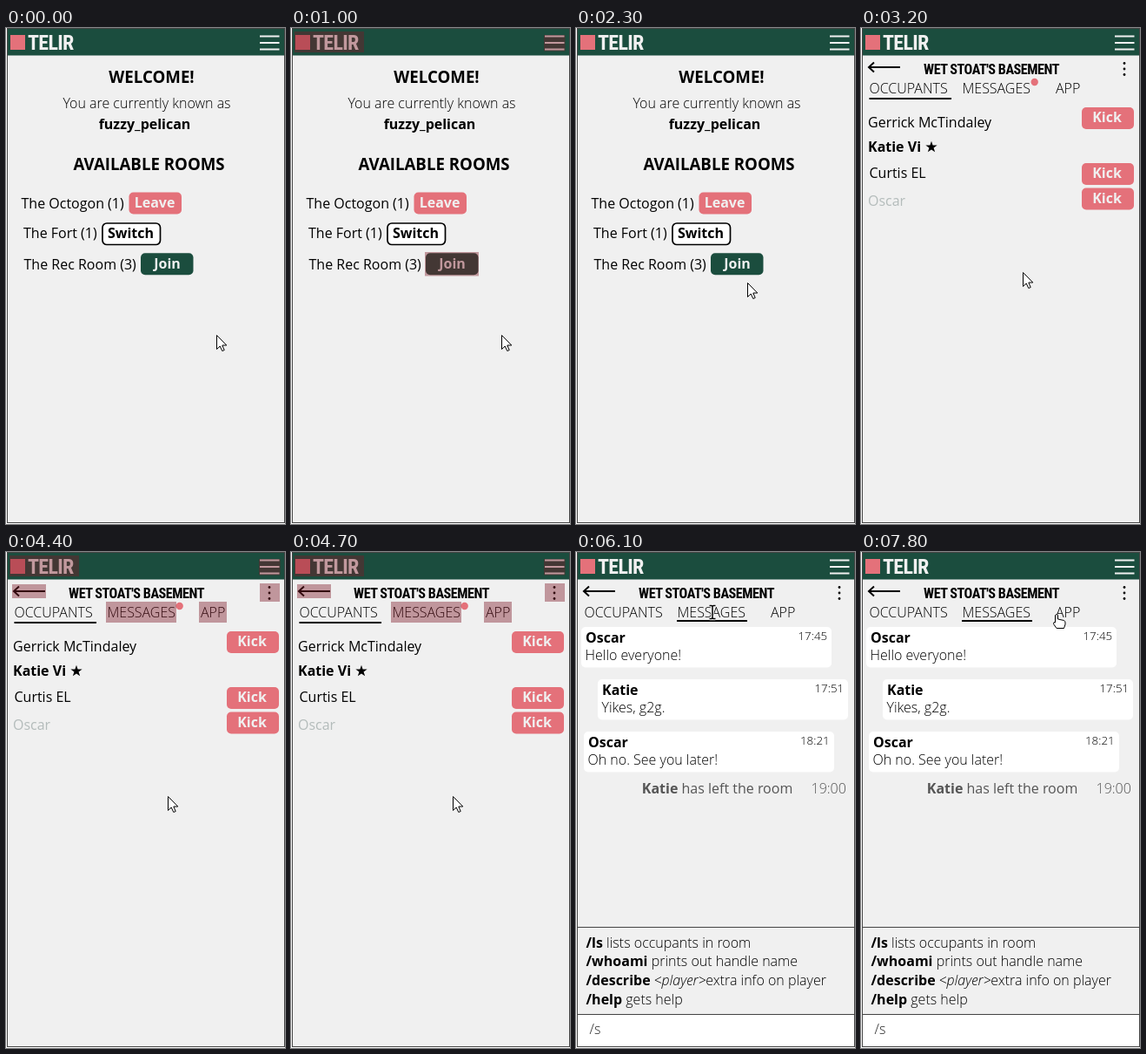
Write an HTML page that moves like this. It is 321 px wide and 569 px high and loops after 8 s.

```html
<!DOCTYPE html>
<html lang="en">
<head>
<meta charset="utf-8">
<title>Chat rooms prototype</title>
<style>
html, body { margin: 0; width: 100%; height: 100%; overflow: hidden; background: #fff; }
svg { display: block; width: 321px; height: 569px; }
text { font: 400 16px "Open Sans", "Noto Sans", sans-serif; white-space: pre; }
.light { font-weight: 300; }
.bold { font-weight: 700; }
.head { font-weight: 700; font-size: 18.67px; }
.mid { text-anchor: middle; }
.end { text-anchor: end; }
.time { font-weight: 300; font-size: 13.33px; }
.label { font-weight: 700; text-anchor: middle; fill: #f0f0f0; }
.narrow {
  font-family: "Roboto Condensed", Roboto, sans-serif;
  font-weight: 700; font-stretch: 75%; letter-spacing: -.03em;
}
.logo { font-size: 24px; fill: #f0f0f0; }
.title { font-size: 18px; }
.line { fill: none; stroke: #000; stroke-width: 2; }
.hot rect { fill: rgb(125, 25, 38); }
.cursor { fill: #fff; stroke: #000; }
.pink { fill: #e4717a; }
</style>
</head>
<body>
<svg viewBox="0 0 321 569">
  <rect x="1" y="1" width="320" height="567" fill="#f0f0f0"/>
  <rect x="1" y="1" width="320" height="30.5" fill="#1b4d3e"/>
  <rect class="pink" x="5" y="8" width="17" height="17"/>
  <text class="narrow logo" x="25" y="25" data-width="57">TELIR</text>
  <path d="M292 9.5H314.5M292 17H314.5M292 24.5H314.5" stroke="#f0f0f0" stroke-width="2.2"/>

  <g id="lobby">
    <text class="head mid" x="167.5" y="63">WELCOME!</text>
    <text class="light mid" x="162" y="92">You are currently known as</text>
    <text class="bold mid" x="159.5" y="116">fuzzy_pelican</text>
    <text class="head mid" x="164.5" y="163">AVAILABLE ROOMS</text>
    <text x="17.5" y="207">The Octogon (1)</text>
    <text x="20" y="241">The Fort (1)</text>
    <text x="20.5" y="277">The Rec Room (3)</text>
    <rect class="pink" x="141.5" y="188.5" width="60.5" height="25" rx="5"/>
    <text class="label" x="171" y="206">Leave</text>
    <rect x="111" y="224" width="66.5" height="24.5" rx="5" fill="#fff" stroke="#000" stroke-width="1.7"/>
    <text class="bold mid" x="143.5" y="241">Switch</text>
    <rect x="155" y="258.3" width="60.5" height="25" rx="5" fill="#1b4d3e"/>
    <text class="label" x="185.5" y="276">Join</text>
  </g>

  <g id="room">
    <path class="line" d="M45 45H9M15 39.5L9 45L15 50.5"/>
    <text class="narrow title mid" x="150" y="52.5" data-width="156">WET STOAT'S BASEMENT</text>
    <g><circle cx="303" cy="40.5" r="1.4"/><circle cx="303" cy="47" r="1.4"/><circle cx="303" cy="53.5" r="1.4"/></g>
    <text class="light" x="9.5" y="75">OCCUPANTS</text>
    <text class="light" x="116.5" y="75">MESSAGES</text>
    <text class="light" x="224" y="75">APP</text>
  </g>

  <g id="occupants">
    <path class="line" d="M9.5 81H104"/>
    <circle class="pink" cx="199.7" cy="62" r="4.2"/>
    <text x="8" y="114">Gerrick McTindaley</text>
    <text class="bold" x="8" y="142">Katie Vi</text>
    <path id="star"/>
    <text x="9.5" y="172">Curtis EL</text>
    <text x="8" y="204" fill="#b4bcbb">Oscar</text>
  </g>

  <g id="messages">
    <path class="line" d="M116 79H197"/>
    <g id="cards"></g>
    <text class="end" x="249.3" y="277" fill="#555"><tspan class="bold">Katie</tspan> has left the room</text>
    <text class="light" x="270.5" y="277" fill="#555">19:00</text>
    <path d="M1 430.5H321" stroke="#444"/>
    <text class="light" x="11.5" y="454"><tspan class="bold">/ls</tspan> lists occupants in room</text>
    <text class="light" x="11.5" y="475"><tspan class="bold">/whoami</tspan> prints out handle name</text>
    <text class="light" x="11.5" y="497"><tspan class="bold">/describe</tspan> <tspan font-style="italic">&lt;player&gt;</tspan>extra info on player</text>
    <text class="light" x="11.5" y="519"><tspan class="bold">/help</tspan> gets help</text>
    <rect x="1.5" y="530.5" width="319" height="37" fill="#fff" stroke="#444"/>
    <text class="light" x="15.5" y="553" fill="#222">/s</text>
  </g>

  <rect x="1.5" y=".5" width="319" height="567" fill="none" stroke="#444"/>

  <g class="hot" id="hotBar">
    <rect x="4" y="4" width="80" height="24"/>
    <rect x="291" y="8" width="24.5" height="18.5"/>
  </g>
  <g class="hot" id="hotLobby"><rect x="154" y="257" width="62" height="27.5"/></g>
  <g class="hot" id="hotRoom">
    <rect x="7" y="37" width="39" height="16"/>
    <rect x="292" y="36" width="23" height="21"/>
    <rect x="115" y="57" width="81" height="24"/>
    <rect x="222" y="57" width="32" height="24"/>
  </g>

  <g id="pointer">
    <path id="arrow" class="cursor" d="M.5 .5V16.5L4.2 13L6.8 18.5L9.2 17.5L6.8 12H11.8Z"/>
    <path id="hand" class="cursor" d="M-1.5 9.5V1.5Q0 -.5 1.5 1.5V6L8.5 7.5Q10 8 10 10V12L8.5 16.5H0L-3.5 11.5Q-3.5 8.5 -1.5 10Z"/>
    <g id="ibeam" fill="none">
      <path d="M-3.5 -7.5H3.5M0 -7.5V7.5M-3.5 7.5H3.5" stroke="#fff" stroke-width="3.4"/>
      <path d="M-3.5 -7.5H-1L0 -6.5L1 -7.5H3.5M0 -6.5V6.5M-3.5 7.5H-1L0 6.5L1 7.5H3.5" stroke="#000" stroke-width="1.5"/>
    </g>
  </g>
</svg>
<script>
const $ = id => document.getElementById(id);
const LOOP = 8000, STEP = 100;
const ENTER_ROOM = 3100, OPEN_MESSAGES = 6100;
const FLASHES = [1000, 4400, 4700];

// time, x, y, cursor kind
const TRACK = [
  [0, 242, 352, "arrow"], [1800, 242, 352, "arrow"], [2000, 272, 342, "arrow"],
  [2200, 220, 312, "arrow"], [2300, 197, 292, "arrow"], [2400, 189, 285, "arrow"],
  [2500, 189, 285, "arrow"], [2600, 187, 281, "hand"], [2700, 187, 281, "hand"],
  [2800, 186, 280, "hand"], [3200, 186, 280, "arrow"], [4900, 186, 280, "arrow"],
  [5200, 165, 145, "arrow"], [5400, 160, 98, "arrow"], [5500, 158, 78, "arrow"],
  [5600, 157, 69, "hand"], [6100, 157, 69, "ibeam"], [6700, 157, 69, "ibeam"],
  [7200, 198, 75, "arrow"], [7600, 225, 71, "arrow"], [7800, 225, 71, "hand"]
];

const kickButton = y => `<rect class="pink" x="254" y="${y}" width="60" height="25" rx="5"/>
  <text class="label" x="283" y="${y + 17}">Kick</text>`;
$("occupants").innerHTML += [91, 155, 183.5].map(kickButton).join("");

const card = (x, y, name, words, time, timeX) => `
  <rect x="${x}" y="${y}" width="288" height="46.5" rx="5" fill="#fff"/>
  <text class="bold" x="${x + 5}" y="${y + 18}">${name}</text>
  <text class="light" x="${x + 4.5}" y="${y + 38}">${words}</text>
  <text class="time" x="${timeX}" y="${y + 15}">${time}</text>`;
$("cards").innerHTML =
  card(6, 86, "Oscar", "Hello everyone!", "17:45", 255.5) +
  card(25, 146, "Katie", "Yikes, g2g.", "17:51", 274.5) +
  card(9, 206, "Oscar", "Oh no. See you later!", "18:21", 258);

const starPoint = i => {
  const radius = i % 2 ? 2.7 : 7, angle = i * Math.PI / 5;
  return `${81 + radius * Math.sin(angle)} ${136.7 - radius * Math.cos(angle)}`;
};
$("star").setAttribute("d", "M" + Array.from({ length: 10 }, (_, i) => starPoint(i)).join("L") + "Z");

// Use a smaller size where no condensed face is available.
for (const el of document.querySelectorAll("[data-width]")) {
  const size = parseFloat(getComputedStyle(el).fontSize);
  const ratio = el.dataset.width / el.getComputedTextLength();
  if (ratio < 1) el.style.fontSize = size * ratio + "px";
}

const show = (id, on) => { $(id).style.display = on ? "" : "none"; };

function flashOpacity(t) {
  const start = FLASHES.filter(f => f <= t).pop();
  return start === undefined ? 0 : 0.41 * Math.max(0, 1 - (t - start) / 500);
}

function pointerAt(t) {
  const next = TRACK.findIndex(p => p[0] > t);
  if (next < 0) return TRACK[TRACK.length - 1].slice(1);
  const [t0, x0, y0, kind] = TRACK[next - 1], [t1, x1, y1] = TRACK[next];
  const k = (t - t0) / (t1 - t0);
  return [x0 + (x1 - x0) * k, y0 + (y1 - y0) * k, kind];
}

function draw() {
  const t = Math.floor(performance.now() % LOOP / STEP) * STEP;
  const inRoom = t >= ENTER_ROOM, inMessages = t >= OPEN_MESSAGES;
  show("lobby", !inRoom);
  show("room", inRoom);
  show("occupants", inRoom && !inMessages);
  show("messages", inMessages);

  const glow = flashOpacity(t);
  $("hotBar").style.opacity = glow;
  $("hotLobby").style.opacity = inRoom ? 0 : glow;
  $("hotRoom").style.opacity = inRoom ? glow : 0;

  const [x, y, kind] = pointerAt(t);
  $("pointer").setAttribute("transform", `translate(${Math.round(x)} ${Math.round(y)})`);
  for (const id of ["arrow", "hand", "ibeam"]) show(id, id === kind);
  requestAnimationFrame(draw);
}
draw();
</script>
</body>
</html>
```
